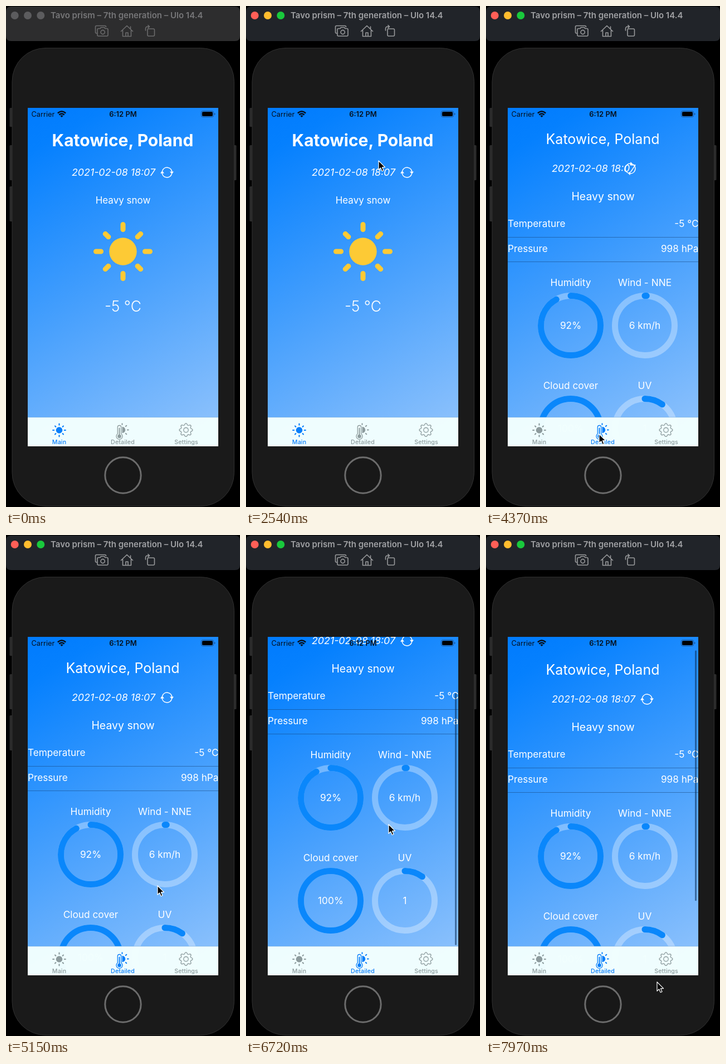
Write an HTML page that moves like this. It is 420x900 px and loops after 8 s.

```html
<!DOCTYPE html>
<html lang="en">
<head>
<meta charset="utf-8">
<title>Weather app</title>
<style>
  html, body { margin: 0; width: 100%; height: 100%; overflow: hidden; background: #000; }
  svg { display: block; width: 100%; height: 100%; }
  text { font-family: Inter, "Open Sans", sans-serif; fill: #fff; }
  .mid { text-anchor: middle; }
  .end { text-anchor: end; }
  .line { fill: none; stroke: currentColor; stroke-linecap: round; stroke-linejoin: round; }
  #bar { color: #6b6b6c; }
  #bar .back { fill: #2d2d2e; }
  #bar text { fill: #767678; font-weight: 600; font-size: 15px; }
  #bar circle.dot { fill: #5c5c5e; }
  #bar.active { color: #98999b; }
  #bar.active .back { fill: #212429; }
  #bar.active text { fill: #a0a1a4; }
  #bar.active .red { fill: #ff5f57; }
  #bar.active .yellow { fill: #febc2e; }
  #bar.active .green { fill: #19c83c; }
  .status text { fill: #06101c; }
  .tab { color: #8d9b9d; fill: currentColor; }
  .tab.on { color: #087efa; }
  .tab text { fill: currentColor; font-size: 10.7px; font-weight: 500; letter-spacing: .1px; }
  .ring { font-size: 17.3px; }
  .ring circle { fill: none; stroke: #fff; stroke-opacity: .32; stroke-width: 11; }
  .ring .value { stroke: #0a87fb; stroke-opacity: 1; stroke-linecap: round; }
  .rule { stroke: #123e70; stroke-opacity: .5; }
</style>
</head>
<body>
<svg viewBox="0 0 420 900">
  <defs>
    <linearGradient id="sky" gradientUnits="userSpaceOnUse" x1="39" y1="183" x2="381" y2="791">
      <stop offset="0" stop-color="#007bfe"/>
      <stop offset=".1" stop-color="#0580fe"/>
      <stop offset="1" stop-color="#94c5fc"/>
    </linearGradient>
    <clipPath id="screen"><rect x="39" y="183" width="342" height="608"/></clipPath>
    <path id="rays2" d="M0-48.5V-39.5M0 48.5V39.5"/>
    <g id="sun">
      <circle r="24.7"/>
      <g stroke="currentColor" stroke-width="9" stroke-linecap="round">
        <use href="#rays2"/>
        <use href="#rays2" transform="rotate(45) scale(1 .93)"/>
        <use href="#rays2" transform="rotate(90)"/>
        <use href="#rays2" transform="rotate(135) scale(1 .93)"/>
      </g>
    </g>
    <g id="refresh" color="#fff">
      <path class="line" stroke-width="1.6" d="M-8.1-3.6A8.9 8.9 0 0 1 8.9-1M8.1 3.6A8.9 8.9 0 0 1-8.9 1"/>
      <path fill="#fff" d="M5-1.5h7L8.6 3.2zM-5 1.5h-7L-8.6-3.2z"/>
    </g>
  </defs>

  <rect width="420" height="900"/>

  <g id="bar">
    <path class="back" d="M0 10Q0 1 9 1H411Q420 1 420 10V54Q420 63 411 63H9Q0 63 0 54z"/>
    <circle class="dot red" cx="15.7" cy="17" r="7"/>
    <circle class="dot yellow" cx="39" cy="17" r="7"/>
    <circle class="dot green" cx="62.3" cy="17" r="7"/>
    <text x="80" y="22">Tavo prism – 7th generation – Ulo 14.4</text>
    <g class="line" stroke-width="1.6">
      <path d="M163.500 49h-1q-2 0-2-2V37.500q0-2 2-2h15q2 0 2 2M166 40.500h3l1.500-2h6l1.500 2h3q2 0 2 2V52q0 2-2 2H166q-2 0-2-2v-9.500q0-2 2-2z"/>
      <circle cx="173.700" cy="47" r="3.600"/>
      <path d="M206.500 45.500 217 35.500 227.500 45.500M209.500 43.500V54.500H224.500V43.500M215 54V48h4v6M223.500 37v4"/>
      <rect x="254" y="41" width="12.500" height="13" rx="2"/>
      <path d="M250.500 44V41Q250.500 37 254.500 37H257M255 34.500 257.500 37 255 39.500"/>
    </g>
  </g>

  <g fill="#2b2b2b">
    <rect x="6.500" y="183" width="6" height="34" rx="1.500"/>
    <rect x="6.500" y="250" width="6" height="63" rx="1.500"/>
    <rect x="6.500" y="324" width="6" height="63" rx="1.500"/>
    <rect x="407.500" y="250" width="6" height="63" rx="1.500"/>
  </g>
  <rect x="11" y="75.500" width="398.500" height="823" rx="60" fill="#1a1a1a" stroke="#303030"/>
  <circle cx="210" cy="843" r="32.200" fill="#181818" stroke="#6c6c6c" stroke-width="3"/>

  <g clip-path="url(#screen)">
    <rect x="39" y="183" width="342" height="608" fill="url(#sky)"/>

    <g id="main">
      <text class="mid" x="209.500" y="251.500" font-size="30" font-weight="700">Katowice, Poland</text>
      <text x="118" y="305.300" font-size="17.800" font-style="italic">2021-02-08 18:07</text>
      <use href="#refresh" x="289" y="299"/>
      <text class="mid" x="210" y="355" font-size="17">Heavy snow</text>
      <use href="#sun" transform="translate(210 441)" fill="#fdca35" color="#fdca35"/>
      <text class="mid" x="210" y="549" font-size="26.500" font-weight="300">-5 °C</text>
    </g>

    <g id="detail">
      <text class="mid" x="209.500" y="248.300" font-size="25">Katowice, Poland</text>
      <text x="118" y="298.300" font-size="17.800" font-style="italic">2021-02-08 18:07</text>
      <use id="spinner" href="#refresh"/>
      <text class="mid" x="210" y="349" font-size="19.500">Heavy snow</text>
      <g font-size="17.200">
        <text x="39" y="397">Temperature</text>
        <text class="end" x="381.500" y="397">-5 °C</text>
        <text x="39" y="441.500">Pressure</text>
        <text class="end" x="381.500" y="441.500">998 hPa</text>
      </g>
      <path class="rule" d="M39 415.500H381M39 459.500H381"/>
      <g id="rings"></g>
    </g>

    <rect id="scrollbar" x="375" width="3" rx="1.500" fill="#0a2c55" fill-opacity=".55"/>

    <g class="status">
      <text x="45.500" y="199" font-size="12.800">Carrier</text>
      <text class="mid" x="210" y="199" font-size="13" font-weight="600">6:12 PM</text>
      <g class="line" color="#06101c" stroke-width="2.400" style="stroke-linecap:butt">
        <path d="M92.800 192.500q7.200-6.400 14.400 0M95.300 195.500q4.700-4.200 9.400 0"/>
      </g>
      <path fill="#06101c" d="M97.400 197.300q2.600-2 5.200 0L100 200z"/>
      <rect x="350.500" y="188.500" width="22" height="11" rx="3" fill="none" stroke="#1d528f"/>
      <rect x="352" y="190" width="19" height="8" rx="1.800"/>
      <path fill="#1d528f" d="M374 192q1.600.4 1.600 2t-1.600 2z"/>
    </g>

    <rect x="39" y="739" width="342" height="52" fill="#f2fffe" fill-opacity=".975"/>
    <path d="M39 738.800H381" stroke="#7fb0dc" stroke-opacity=".6"/>
    <g class="tab" id="tabMain">
      <use href="#sun" transform="translate(95.500 762) scale(.235)"/>
      <text class="mid" x="95.500" y="787">Main</text>
    </g>
    <g class="tab" id="tabDetail">
      <g transform="translate(208.500 761.500) scale(.235)">
        <path d="M0-24.500a24.500 24.500 0 0 1 0 49z"/>
        <path class="line" stroke-width="8.500" d="M0-48V-40M33-33l-6 6M48 0h-8M33 33l-6-6"/>
      </g>
      <path fill="#f2fffe" stroke="currentColor" stroke-width="1.300" d="M200.300 768.500V756.700a3.200 3.200 0 0 1 6.400 0V768.500a5.500 5.500 0 1 1-6.400 0z"/>
      <path class="line" stroke-width="2" d="M203.500 758.500V771"/>
      <circle cx="203.500" cy="773" r="3.300"/>
      <text class="mid" x="209.500" y="787">Detailed</text>
    </g>
    <g class="tab">
      <g class="line" stroke-width="1.300" transform="translate(323 761.700)">
        <path id="gear"/>
        <circle r="4.200"/>
      </g>
      <text class="mid" x="323.500" y="787">Settings</text>
    </g>
  </g>

  <path id="cursor" d="M0 0V16.300L3.700 12.800 6.200 18.700 9 17.500 6.500 11.700H11.600z" stroke="#fff" stroke-width="1.200" stroke-linejoin="round"/>
</svg>

<script>
const LOOP = 8000;
const $ = id => document.getElementById(id);

// Bursts of movement: start, end, number of pictures
const bursts = [
  [700, 1480, 9], [1670, 2150, 6], [2340, 2540, 3], [2730, 3400, 8],
  [3600, 3880, 4], [4370, 5150, 9], [6140, 6720, 7], [7220, 7970, 9]
];

// Tracks: time followed by values
const pointer = [
  [700, 306, 420], [992, 206, 341], [1230, 304, 400], [1480, 264, 467],
  [1670, 240, 490], [1900, 252, 566], [2150, 297, 450],
  [2340, 284, 390], [2540, 238, 278],
  [2900, 245, 380], [3140, 201, 690], [3250, 209, 802], [3400, 203, 769],
  [4370, 203, 769], [4760, 343, 655], [5150, 272, 630],
  [6140, 271, 626], [6430, 270, 603], [6720, 256, 520],
  [7220, 255, 526], [7407, 253, 549], [7640, 268, 650], [7970, 307, 803]
];
const scroll = [
  [6140, 0], [6430, 15.5], [6560, 62], [6720, 102], [7126, 102], [7407, 87.6],
  [7600, 38], [7780, 2], [7876, -8], [7970, -3]
];
const spinner = [[4370, 259, 100], [4560, 279, 220], [4760, 289, 290], [5150, 289, 360]];

function track(keys, t) {
  if (t <= keys[0][0]) return keys[0].slice(1);
  const i = keys.findIndex(k => k[0] > t);
  if (i < 0) return keys[keys.length - 1].slice(1);
  const a = keys[i - 1], b = keys[i];
  const f = (t - a[0]) / (b[0] - a[0]);
  return a.slice(1).map((v, n) => v + (b[n + 1] - v) * f);
}

function lastRefresh(t) {
  const burst = bursts.filter(b => t >= b[0]).pop();
  if (!burst) return 0;
  const [start, end, count] = burst;
  const step = (end - start) / (count - 1);
  return Math.min(end, start + Math.floor((t - start + 8) / step) * step);
}

function ring(x, y, label, value, part) {
  return `<g class="ring" transform="translate(${x} ${y})">
    <text class="mid" y="-71">${label}</text>
    <circle r="53.500"/>
    <circle class="value" r="53.500" transform="rotate(-90)" pathLength="100"
      stroke-dasharray="${part} ${part < 100 ? 200 : 0}"/>
    <text class="mid" y="6.300">${value}</text></g>`;
}

$("rings").innerHTML =
  ring(152, 574, "Humidity", "92%", 92) + ring(285, 574, "Wind - NNE", "6 km/h", 1) +
  ring(152, 759, "Cloud cover", "100%", 100) + ring(285, 759, "UV", "1", 10);

$("gear").setAttribute("d", "M" + Array.from({ length: 32 }, (_, i) => {
  const r = i % 4 < 2 ? 11.8 : 9.3, a = (i - .5) * Math.PI / 16;
  return `${(r * Math.cos(a)).toFixed(2)} ${(r * Math.sin(a)).toFixed(2)}`;
}).join("L") + "z");

const show = (id, on) => { $(id).style.display = on ? "" : "none"; };
const place = (id, value) => $(id).setAttribute("transform", value);

function draw(now) {
  const t = now % LOOP;
  const shown = lastRefresh(t);
  const detailed = t >= 3600;

  $("bar").classList.toggle("active", t >= 500);
  show("main", !detailed);
  show("detail", detailed);
  $("tabMain").classList.toggle("on", !detailed);
  $("tabDetail").classList.toggle("on", detailed);

  show("cursor", t >= 700);
  place("cursor", `translate(${track(pointer, shown)})`);

  const [offset] = track(scroll, shown);
  place("detail", `translate(0 ${-offset})`);
  const [x, angle] = track(spinner, shown);
  place("spinner", `translate(${x} 292) rotate(${angle})`);

  show("scrollbar", t >= 6140);
  $("scrollbar").setAttribute("y", 207.3 + .75 * Math.max(0, offset));
  $("scrollbar").setAttribute("height", 453 + Math.min(0, offset));
}

const began = performance.now();
function tick() {
  draw(performance.now() - began);
  requestAnimationFrame(tick);
}
tick();
</script>
</body>
</html>
```
